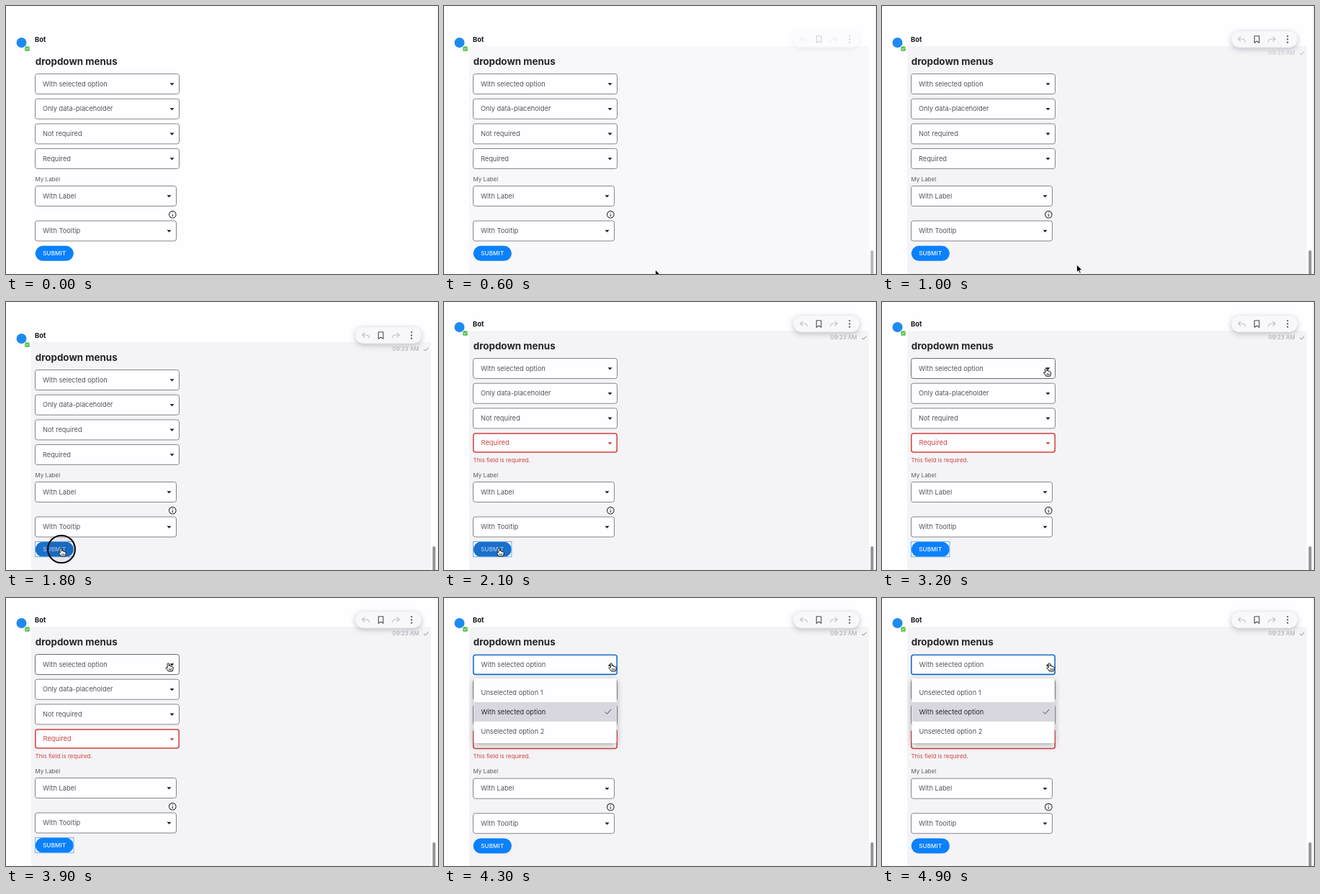
These frames come from a looping animation (600x373 px, 5000 ms). An HTML page:

```html
<!DOCTYPE html>
<html lang="en">
<head>
<meta charset="utf-8">
<title>Dropdown menus</title>
<style>
html, body { margin: 0; width: 100%; height: 100%; overflow: hidden; background: #fefdff; }
svg { display: block; width: 600px; height: 373px; font-family: Inter, "Liberation Sans", sans-serif; }
.field rect { fill: #fefdff; stroke: #85868b; }
.field text, .menu text { font-size: 9.25px; fill: #53555c; }
.field path { fill: #1c1d20; }
.field.hover rect { stroke: #6c6d73; }
.field.open rect { stroke: #1a6fc4; stroke-width: 1.6; }
.field.error rect { stroke: #d0403a; stroke-width: 1.5; }
.field.error text, .field.error path { fill: #cc4740; }
.small { font-size: 8px; fill: #5c5e64; }
.line { fill: none; stroke-linecap: round; stroke-linejoin: round; }
</style>
</head>
<body>
<svg id="stage" viewBox="0 0 600 373" xmlns="http://www.w3.org/2000/svg">
  <defs>
    <filter id="soft" x="-25%" y="-80%" width="150%" height="290%">
      <feDropShadow dx="0" dy="2" stdDeviation="4" flood-color="#25272b" flood-opacity=".27"/>
    </filter>
    <filter id="deep" x="-15%" y="-15%" width="130%" height="140%">
      <feDropShadow dx="0" dy="3" stdDeviation="4" flood-color="#25272b" flood-opacity=".38"/>
    </filter>
  </defs>
  <rect width="600" height="373" fill="#fefdff"/>
  <rect x="599" width="1" height="373" fill="#efeef1"/>
  <rect id="panel" x="35" width="555" height="400" rx="2" fill="#f4f3f6"/>
  <path id="thumb" d="M592.5 374V342q0-2 2-2t2 2V374z" fill="#929196"/>

  <g id="top">
    <circle cx="21.5" cy="51" r="7" fill="#1e8af0"/>
    <rect x="25.5" y="55.5" width="8" height="8" rx="2" fill="#fefdff"/>
    <rect x="26.2" y="56.2" width="6.6" height="6.6" rx="1.5" fill="#57c04d"/>
    <path class="line" d="M27.8 59.5l1.2 1.2 2.2-2.3" stroke="#fff"/>
    <text x="40" y="49.7" font-size="9.33" font-weight="700" fill="#141518">Bot</text>
    <text x="40.7" y="82" font-size="13.4" font-weight="700" fill="#25272b">dropdown menus</text>
  </g>
  <g id="fields"></g>
  <g id="low">
    <text class="small" x="40.6" y="243.5">My Label</text>
    <g class="line" stroke="#33353a" stroke-width="1.1">
      <circle cx="231.3" cy="290.2" r="4.8"/>
      <path d="M231.3 290v2.6M231.3 287.7v.1"/>
    </g>
    <rect id="pill" x="40.7" y="333.8" width="53.2" height="21" rx="10.5"/>
    <rect id="focus" x="40.5" y="333.5" width="53.4" height="21.2" fill="none" stroke="#6fb2f3"/>
    <text id="submit" x="67.3" y="347.2" text-anchor="middle" font-size="8" font-weight="500" letter-spacing=".2">SUBMIT</text>
  </g>
  <text id="error" class="small" x="40.6" y="222.6" style="fill:#cc4740">This field is required.</text>

  <g id="tools">
    <rect x="485.5" y="35.5" width="91" height="22" rx="11" fill="#f8f7fa" filter="url(#soft)"/>
    <g class="line" stroke-width="1.1">
      <path d="M498 43l-3.3 3 3.3 3M495 46h5.5q3.5 0 4 4" stroke="#c3c2c8"/>
      <path d="M517.3 41.7h6.6v9.6l-3.3-2.3-3.3 2.3z" stroke="#4b4d54"/>
      <path d="M543 43l3.3 3-3.3 3M546 46h-5.5q-3.5 0-4 4" stroke="#c3c2c8"/>
      <path d="M563.3 42v.1M563.3 46.3v.1M563.3 50.6v.1" stroke="#4b4d54" stroke-width="2.2"/>
    </g>
  </g>
  <g id="time">
    <text x="536.6" y="68.4" font-size="8" fill="#a9a8ad">09:23 AM</text>
    <path class="line" d="M580.6 66.2l1.8 1.8 3.7-4" stroke="#85868b"/>
  </g>

  <g id="menu" class="menu">
    <rect x="41.5" y="112" width="198" height="90" rx="2" fill="#fefdff" filter="url(#deep)"/>
    <rect x="41.5" y="145" width="198" height="27" fill="#d8d7df"/>
    <text x="51.5" y="135.2">Unselected option 1</text>
    <text x="51.5" y="161.9" style="fill:#25272b">With selected option</text>
    <text x="51.5" y="188.5">Unselected option 2</text>
    <path class="line" d="M224 158.7l2.6 2.6 5.2-6" stroke="#45474d"/>
  </g>

  <circle id="ring" cx="77" cy="344" r="19" fill="#000" fill-opacity=".06" stroke="#0b0b0c" stroke-width="2"/>
  <path id="arrow" d="M-.5 0V10.6L2 8.4 3.6 12.1 5.3 11.4 3.7 7.8H7.1Z" fill="#000" stroke="#fff" stroke-width=".8"/>
  <g id="hand" class="line">
    <path d="M-2 .2Q-2-1.2-.8-1.2 .4-1.2 .4 .2V3Q2-1 2.8 3.4 4 2.4 4.8 4 6.2 3.4 6.2 5.2 6.2 8 5 10H-.6Q-1.6 7.8-4 5.6-4.4 4-2 5Z" style="fill:#fff" stroke="#111" stroke-width="1"/>
    <path d="M.6 6.4v2M2.2 6.4v2M3.8 6.4v2" stroke="#111" stroke-width=".7"/>
  </g>
</svg>
<script>
const LOOP = 5000, STEP = 100;
const NS = "http://www.w3.org/2000/svg";
const $ = id => document.getElementById(id);
const set = (el, attrs) => { for (const k in attrs) el.setAttribute(k, attrs[k]); };
const show = (el, on) => set(el, { visibility: on ? "visible" : "hidden" });
const shift = (el, x, y) => set(el, { transform: `translate(${x} ${y})` });
const ramp = (t, a, b) => Math.min(1, Math.max(0, (t - a) / (b - a)));

function add(parent, tag, attrs, text) {
  const el = document.createElementNS(NS, tag);
  set(el, attrs);
  if (text) el.textContent = text;
  return parent.appendChild(el);
}

function field(label, y, w = 200) {
  const g = add($("fields"), "g", { class: "field" });
  const box = add(g, "rect", { x: 40.5, y: 0, width: w, height: 28, rx: 3 });
  const text = add(g, "text", { x: 51, y: 17.2 }, label);
  const tip = add(g, "path", { d: `M${w + 27.5} 12.7h6l-3 3.3z` });
  return { g, box, text, tip, y, w };
}

const fields = [
  field("With selected option", 94.5),
  field("Only data-placeholder", 129.2),
  field("Not required", 163.9),
  field("Required", 198.5),
  field("With Label", 250.5, 196),
  field("With Tooltip", 299, 196)
];

// pointer path: time, x, y
const path = [
  [0, 312, 380], [100, 312, 369], [200, 262, 369], [300, 280, 380],
  [400, 305, 380], [500, 300, 369], [1000, 271, 360], [1100, 255, 359],
  [1200, 212, 356], [1300, 155, 351], [1400, 110, 347], [1500, 85, 345],
  [1600, 77, 344], [2300, 77, 344], [2400, 112, 338], [2500, 250, 290],
  [2600, 420, 205], [2700, 384, 156], [2800, 295, 114], [2900, 236, 97],
  [3300, 226, 92], [4100, 226, 92], [4200, 233, 92], [LOOP, 233, 92]
];

function pointer(t) {
  const i = path.findIndex(p => p[0] > t);
  const [a, b] = [path[i - 1], path[i]];
  const k = ramp(t, a[0], b[0]);
  return [a[1] + (b[1] - a[1]) * k, a[2] + (b[2] - a[2]) * k];
}

function drawFields(invalid, hover, open) {
  fields.forEach((f, i) => {
    const bad = invalid && i === 3;
    const active = open && i === 0;
    const thick = bad || active;
    const up = invalid && i < 4 ? 16 : 0;
    shift(f.g, 0, f.y - up + (open ? 0.7 : 0));
    const state = bad ? " error" : active ? " open" : hover && i === 0 ? " hover" : "";
    f.g.setAttribute("class", "field" + state);
    set(f.box, { x: thick ? 40.8 : 40.5, width: f.w - (thick ? 0.6 : 0),
      y: bad ? 0.4 : 0, height: bad ? 26 : thick ? 27.2 : 28 });
    set(f.text, { x: thick ? 51.6 : 51, y: bad ? 16.6 : 17.2 });
  });
  set(fields[0].tip, { d: open ? "M227.5 15.5h6l-3-3.3z" : "M227.5 12.7h6l-3 3.3z" });
}

function render(ms) {
  const t = Math.floor((ms % LOOP) / STEP) * STEP;
  const invalid = t >= 2000, open = t >= 4300;
  const press = t >= 1500 && t < 2400;
  const dy = invalid ? -16 : 0;

  for (const id of ["top", "tools", "time"]) shift($(id), 0, dy);
  set($("panel"), { y: 56 + dy, opacity: ramp(t, 400, 800) });
  set($("tools"), { opacity: ramp(t, 500, 900) });
  set($("time"), { opacity: 0.55 * ramp(t, 600, 1000) + 0.45 * ramp(t, 1000, 1200) });
  set($("thumb"), { opacity: ramp(t, 400, 700) });

  drawFields(invalid, t >= 2900, open);
  shift($("low"), 0, open ? 0.7 : 0);
  shift($("error"), 0, open ? 0.7 : 0);
  show($("error"), invalid);
  show($("menu"), open);
  show($("focus"), t >= 1800 && t < 4200);
  set($("pill"), { fill: press ? "#1a70cb" : "#0b81fc" });
  set($("submit"), { fill: press ? "#a9cdf2" : "#f4f9ff" });

  const [x, y] = pointer(t);
  const hand = press || t >= 2900;
  show($("hand"), hand);
  show($("arrow"), !hand);
  shift($(hand ? "hand" : "arrow"), x, y);

  const click = t === 1800 || t === 4200 ? 1 : t === 1900 ? 0.5 : 0;
  set($("ring"), { cx: x, cy: y, opacity: click });
}

const start = performance.now();
function tick(now) {
  render(Math.max(0, now - start));
  requestAnimationFrame(tick);
}
render(0);
requestAnimationFrame(tick);
</script>
</body>
</html>
```
